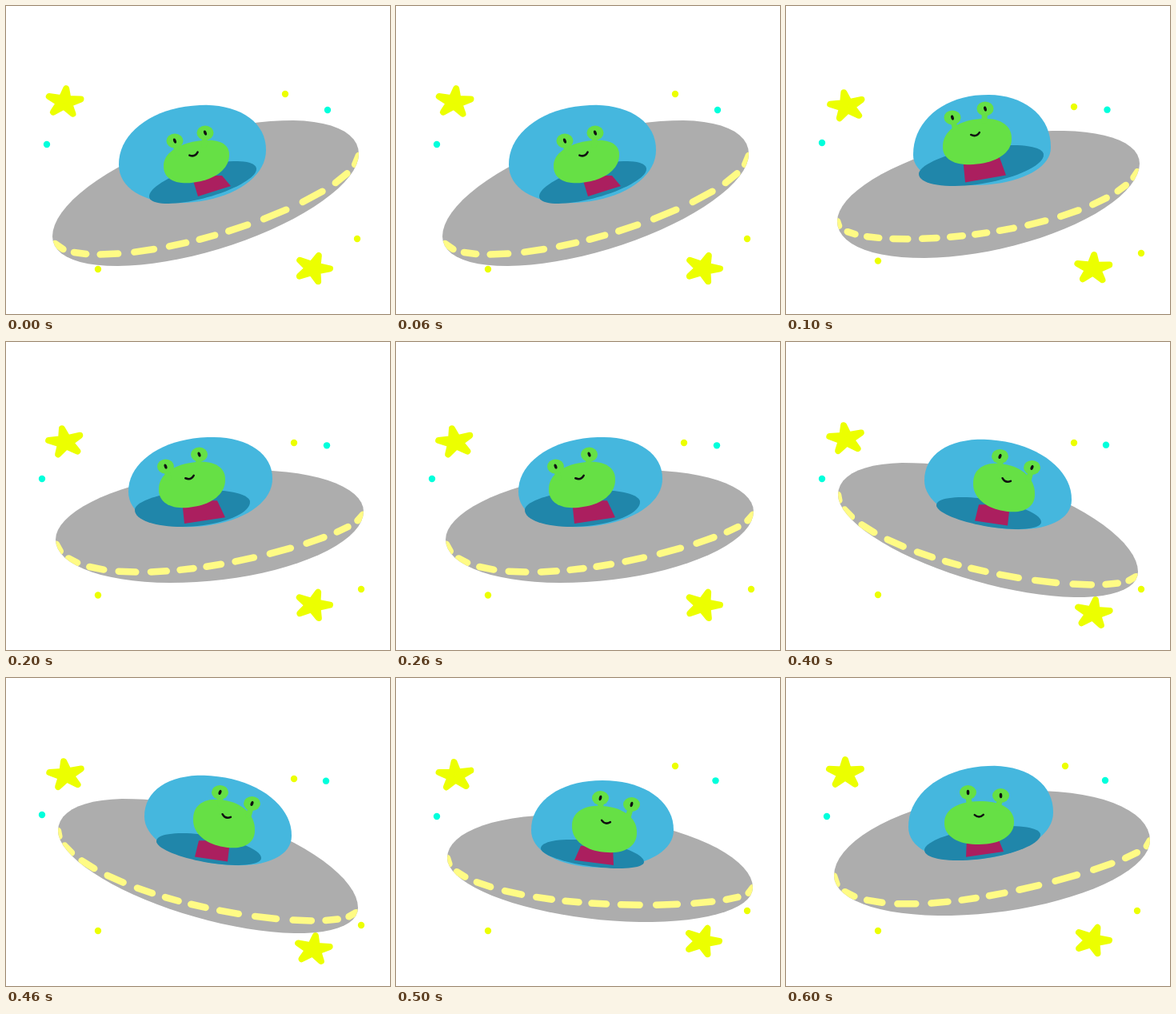
Animation, 480 px wide and 385 px high, one loop 0.7 s. Source, as an HTML page:

```html
<!DOCTYPE html>
<html lang="en">
<head>
<meta charset="utf-8">
<title>Flying saucer</title>
<style>
  html, body { margin: 0; width: 100%; height: 100%; overflow: hidden; background: #fff; }
  svg { display: block; width: 100%; height: 100%; }
</style>
</head>
<body>
<svg id="stage" viewBox="0 0 480 385"></svg>
<script>
const STEP = 100;
const COLOR = {
  hull: '#adadad', lamp: '#fffb85', glass: '#45b7de', floor: '#2086aa',
  shirt: '#ab1f5f', skin: '#66e045', star: '#ecff00', cyan: '#00ffdc', ink: '#111'
};

// hull, dome, floor, head: left, top, right, bottom, then y of the left and right tips
// belt: depth, skew, inset at both ends, lamp count    eyes: offsets from the head's middle
// shirt: x of both shoulders and both hem corners      stars: x, y, spin in degrees
const POSES = [
  {
    hull: [58, 143, 441, 325, 288, 185], dome: [141, 124, 325, 246, 198, 180],
    floor: [179, 194, 313, 247, 238, 204], head: [197, 168, 279, 221, 200, 186],
    eyes: [[-27, -26], [11, -36]], shirt: [232, 270, 240, 281],
    belt: [.74, 0, 16, 8, 11], stars: [[73, 120, 6], [384, 328, 19]]
  },
  {
    hull: [64, 156, 442, 315, 269, 197], dome: [159, 111, 331, 224, 186, 177],
    floor: [166, 174, 322, 225, 210, 186], head: [196, 141, 282, 198, 176, 166],
    eyes: [[-31, -30], [10, -41]], shirt: [221, 267, 224, 275],
    belt: [.68, -.15, 2, 15, 13], stars: [[76, 125, -10], [384, 328, 3]]
  },
  {
    hull: [62, 160, 447, 301, 247, 212], dome: [153, 119, 333, 231, 187, 171],
    floor: [161, 185, 305, 231, 210, 200], head: [191, 150, 274, 207, 184, 172],
    eyes: [[-33, -23], [9, -38]], shirt: [220, 264, 223, 274],
    belt: [.73, .25, 11, 9, 12], stars: [[74, 125, -11], [384, 329, 17]]
  },
  {
    hull: [64, 163, 441, 304, 222, 260], dome: [180, 127, 350, 230, 181, 199],
    floor: [188, 194, 337, 230, 203, 216], head: [228, 161, 310, 211, 184, 188],
    eyes: [[-13, -36], [29, -29]], shirt: [243, 284, 236, 284],
    belt: [.49, -.3, 2, 3, 12], stars: [[73, 124, -10], [383, 342, 3]]
  },
  {
    hull: [65, 151, 440, 319, 191, 287], dome: [173, 122, 357, 234, 173, 197],
    floor: [188, 194, 319, 234, 204, 225], head: [234, 152, 311, 212, 177, 190],
    eyes: [[-5, -39], [35, -25]], shirt: [241, 280, 236, 277],
    belt: [.76, .16, 2, 12, 12], stars: [[75, 121, -8], [384, 339, 8]]
  },
  {
    hull: [64, 171, 446, 305, 225, 262], dome: [169, 128, 347, 237, 190, 190],
    floor: [181, 202, 310, 238, 213, 230], head: [220, 160, 301, 218, 185, 193],
    eyes: [[-5, -39], [34, -31]], shirt: [231, 271, 223, 272],
    belt: [.66, .2, 3, 4, 12], stars: [[74, 122, -4], [383, 329, 18]]
  },
  {
    hull: [60, 141, 455, 297, 247, 203], dome: [153, 110, 334, 227, 186, 168],
    floor: [173, 185, 318, 228, 215, 196], head: [198, 154, 285, 208, 181, 180],
    eyes: [[-14, -38], [27, -34]], shirt: [226, 265, 225, 272],
    belt: [.68, .3, 6, 3, 12], stars: [[74, 119, 0], [383, 328, 18]]
  }
];

const range = n => Array.from({ length: n }, (_, i) => i);
const soften = (v, power) => Math.sign(v) * Math.abs(v) ** power;

// A slanted oval whose upper and lower halves differ in height.
function egg([left, top, right, bottom, leftY, rightY]) {
  const cy = (leftY + rightY) / 2, lean = (rightY - leftY) / 2;
  return {
    cx: (left + right) / 2, cy, lean, rx: (right - left) / 2,
    up: Math.sqrt((cy - top) ** 2 - lean ** 2),
    down: Math.sqrt((bottom - cy) ** 2 - lean ** 2)
  };
}

function eggPath(e, power = 1) {
  const points = range(72).map(i => {
    const t = i * Math.PI / 36;
    const c = soften(Math.cos(t), power), s = soften(Math.sin(t), power);
    return [e.cx + e.rx * c, e.cy + e.lean * c + (s > 0 ? e.down : e.up) * s];
  });
  return 'M' + points.join('L') + 'Z';
}

function lowerEdge(e, x) {
  const c = (x - e.cx) / e.rx;
  return e.cy + e.lean * c + e.down * Math.sqrt(1 - c * c);
}

// Place of a lamp along the belt, both 0 to 1: tight at the ends, a little tight midway.
function spread(u) {
  const a = 2 * Math.PI * u;
  return u - .021 * Math.sin(a) - .016 * Math.sin(2 * a) - .016 * (1 - Math.cos(a));
}

function lampPath(hull, [depth, skew, start, end, count]) {
  const track = document.createElementNS('http://www.w3.org/2000/svg', 'path');
  track.setAttribute('d', 'M' + range(61).map(i => {
    const t = Math.PI * (1 - i / 60), c = Math.cos(t);
    const drop = hull.down * depth * (1 - skew * c) * Math.sin(t);
    return [hull.cx + hull.rx * c, hull.cy + hull.lean * c + drop];
  }).join('L'));
  const span = track.getTotalLength() - start - end;
  const place = i => start + span * spread(i / (count - 1));
  return range(count).map(i => {
    const reach = .37 * (place(i + .5) - place(i - .5)) - 4;
    const a = track.getPointAtLength(place(i) - reach);
    const b = track.getPointAtLength(place(i) + reach);
    return `M${a.x},${a.y}L${b.x},${b.y}`;
  }).join('');
}

const fill = (d, color) => `<path d="${d}" fill="${color}"/>`;
const line = (d, color, width, extra = '') =>
  `<path d="${d}" fill="none" stroke="${color}" stroke-width="${width}" stroke-linecap="round" ${extra}/>`;
const oval = (x, y, rx, ry, color, extra = '') =>
  `<ellipse cx="${x}" cy="${y}" rx="${rx}" ry="${ry}" fill="${color}" ${extra}/>`;

function drawStar([x, y, spin]) {
  const points = range(10).map(i => {
    const a = (spin + i * 36) * Math.PI / 180, r = i % 2 ? .32 : 1;
    return [x + 21 * r * Math.sin(a), y - 17 * r * Math.cos(a)];
  });
  return `<path d="M${points.join('L')}Z" fill="${COLOR.star}" stroke="${COLOR.star}" stroke-width="8" stroke-linejoin="round"/>`;
}

function drawDots(index) {
  const shift = index > 0 && index < 5 ? 1 : 0;
  const dot = (x, y, color) => oval(x, y, 4.2, 4.2, color);
  return dot(402 - index / 2, 130 - index / 3, COLOR.cyan)
    + dot(51 - 6 * shift, 173 - 2 * shift, COLOR.cyan)
    + dot(349 + 11 * shift, 110 + 16 * shift, COLOR.star)
    + dot(439 + 5 * shift, 291 + 18 * shift, COLOR.star)
    + dot(115, 316 + 13 * .2 ** index, COLOR.star);
}

function drawAlien(head, eyes) {
  const nod = head.lean * 3;
  const midY = head.cy + (head.down - head.up) / 2;
  const drawEye = ([dx, dy]) => {
    const x = head.cx + dx, y = midY + dy;
    return line(`M${x},${y}L${x - dx * .12},${y + 15}`, COLOR.skin, 7)
      + oval(x, y, 10.5, 9, COLOR.skin)
      + oval(x, y, 1.8, 3.2, COLOR.ink, `transform="rotate(${nod} ${x} ${y})"`);
  };
  const mouth = `transform="translate(${head.cx + nod * .15} ${midY - 9}) rotate(${nod})"`;
  return fill(eggPath(head, .9), COLOR.skin) + eyes.map(drawEye).join('')
    + line('M-5.5,-1Q0,4 5.5,-1', COLOR.ink, 2.5, mouth);
}

function drawShirt([shoulderL, shoulderR, hemL, hemR], head, floor) {
  const top = head.cy + head.down - 8;
  const hem = x => [x, lowerEdge(floor, x) - 4];
  return fill(`M${[[shoulderL, top], [shoulderR, top], hem(hemR), hem(hemL)].join('L')}Z`, COLOR.shirt);
}

function drawPose(pose, index) {
  const [hull, dome, floor, head] = [pose.hull, pose.dome, pose.floor, pose.head].map(egg);
  const outline = eggPath(hull);
  return `<clipPath id="rim"><path d="${outline}"/></clipPath>`
    + pose.stars.map(drawStar).join('') + drawDots(index)
    + fill(outline, COLOR.hull)
    + line(lampPath(hull, pose.belt), COLOR.lamp, 8.5, 'clip-path="url(#rim)"')
    + fill(eggPath(dome, .95), COLOR.glass)
    + fill(eggPath(floor), COLOR.floor)
    + drawShirt(pose.shirt, head, floor)
    + drawAlien(head, pose.eyes);
}

const stage = document.getElementById('stage');
let shown = -1;

function update(time) {
  const index = Math.floor(time / STEP) % POSES.length;
  if (index === shown) return;
  stage.innerHTML = drawPose(POSES[index], index);
  shown = index;
}

const start = performance.now();
function tick() {
  update(performance.now() - start);
  requestAnimationFrame(tick);
}
tick();
</script>
</body>
</html>
```
